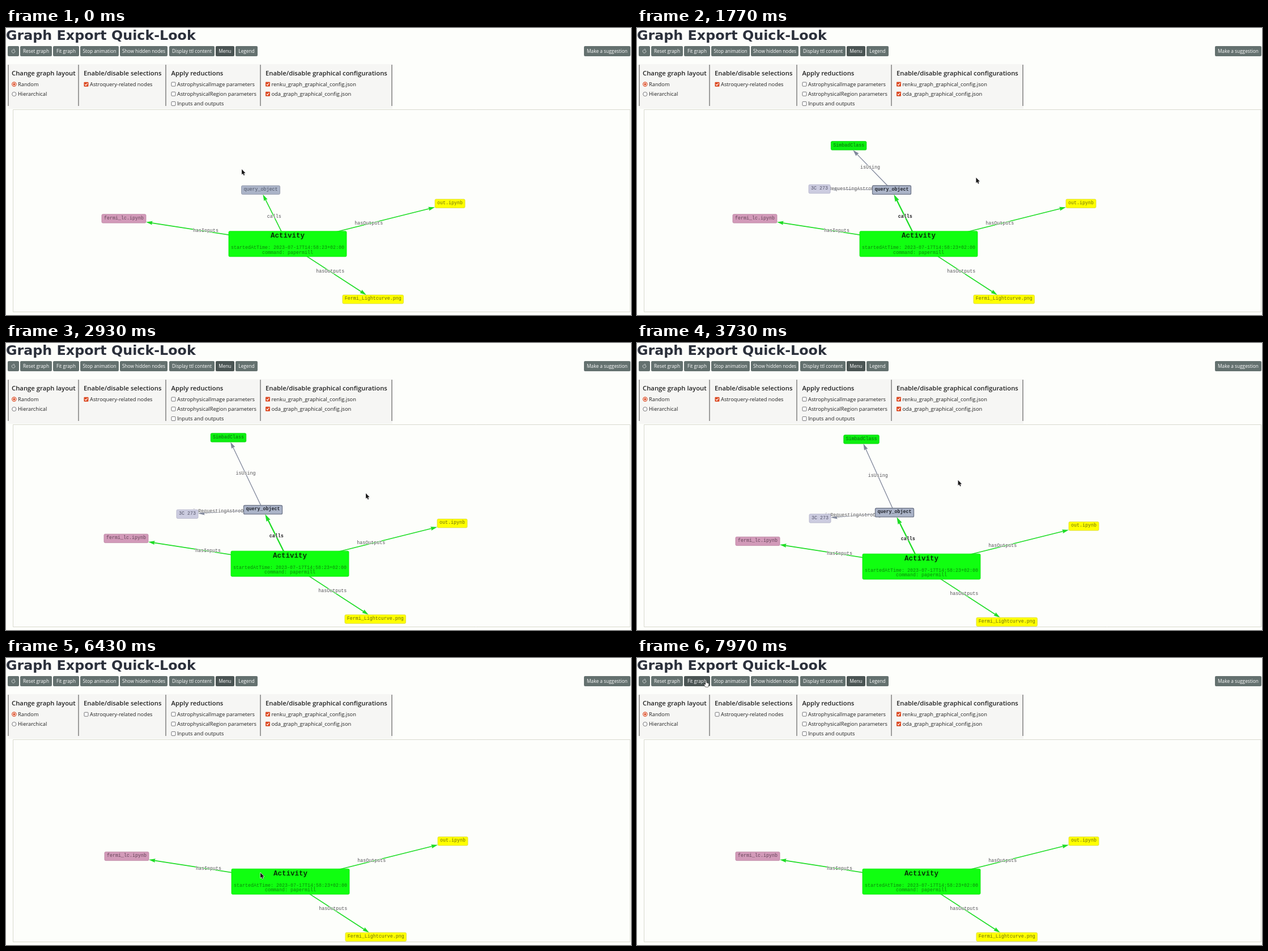
An HTML page with a canvas that plays this animation: 1103 by 508 pixels, repeating every 8000 ms.

```html
<!DOCTYPE html>
<html lang="en">
<head>
<meta charset="utf-8">
<title>Graph Export Quick-Look</title>
<style>
  html, body { margin: 0; width: 100%; height: 100%; overflow: hidden; background: #fdfefb; }
  canvas { display: block; }
</style>
</head>
<body>
<canvas id="stage" width="1103" height="508"></canvas>
<script>
const ctx = document.getElementById('stage').getContext('2d');
const LOOP = 8000, EXPAND = 800, UNCHECK = 4600;
const UI = '"Open Sans", "Noto Sans", sans-serif';
const MONO = '"Liberation Mono", "Courier New", monospace';
const ORANGE = '#dc4a23', GREEN = '#1fdd26', GREY = '#7f869a';

// Key poses: [time, x, y]
const cursorPath = [
  [30, 416, 250], [430, 449, 284], [1000, 450, 284], [1130, 562, 283], [2330, 628, 250],
  [2670, 631, 257.5], [2930, 635, 266], [3100, 636, 271], [3500, 636, 271], [4400, 212, 98],
  [5730, 212, 98], [6400, 449, 380], [6440, 449, 380], [6560, 385, 205], [7380, 200, 110], [7900, 121, 40]
];
const simbadPath = [
  [1130, 398, 284.5], [1450, 381, 245], [1800, 373, 205], [2330, 376, 174.3], [2930, 388.5, 159], [3500, 391, 157]
];
const objectPath = [
  [1130, 395, 287], [1450, 345, 285], [1800, 320, 285], [2330, 314, 288.7], [2930, 316, 294.3], [3500, 318, 297]
];

const linear = k => k;
const smooth = k => k * k * (3 - 2 * k);

function along(path, t, ease) {
  if (t <= path[0][0]) return { x: path[0][1], y: path[0][2] };
  for (let i = 1; i < path.length; i++) {
    const [t0, x0, y0] = path[i - 1], [t1, x1, y1] = path[i];
    if (t < t1) {
      const k = ease((t - t0) / (t1 - t0));
      return { x: x0 + (x1 - x0) * k, y: y0 + (y1 - y0) * k };
    }
  }
  const last = path[path.length - 1];
  return { x: last[1], y: last[2] };
}

function text(str, x, y, font, color, align = 'left', baseline = 'alphabetic') {
  ctx.font = font;
  ctx.fillStyle = color;
  ctx.textAlign = align;
  ctx.textBaseline = baseline;
  ctx.fillText(str, x, y);
}

function roundBox(x, y, w, h, r, fill, stroke, width = 1) {
  ctx.beginPath();
  ctx.roundRect(x, y, w, h, r);
  if (fill) { ctx.fillStyle = fill; ctx.fill(); }
  if (stroke) { ctx.strokeStyle = stroke; ctx.lineWidth = width; ctx.stroke(); }
}

function polyline(points, color, width) {
  ctx.beginPath();
  points.forEach(([x, y]) => ctx.lineTo(x, y));
  ctx.strokeStyle = color;
  ctx.lineWidth = width;
  ctx.stroke();
}

// Toolbar and menu

const buttons = [
  [3, 23, ''], [25, 81, 'Reset graph'], [83, 129, 'Fit graph'], [131, 199, 'Stop animation'],
  [201, 285, 'Show hidden nodes'], [288, 368, 'Display ttl content'], [370, 403, 'Menu'],
  [405, 444, 'Legend'], [1020, 1102, 'Make a suggestion']
];

function overButton(p) {
  return p.y >= 32 && p.y <= 50 && buttons.find(([l, r]) => p.x >= l && p.x <= r);
}

function drawToolbar(hovered) {
  text('Graph Export Quick-Look', 0, 20.7, 'bold 23.8px "DejaVu Sans", sans-serif', '#2b303b');
  for (const button of buttons) {
    const [left, right, label] = button;
    const dark = label === 'Menu' || button === hovered;
    roundBox(left, 32, right - left, 18, 2, dark ? '#4b5554' : '#64716f');
    text(label, (left + right) / 2, 44, '8.3px ' + UI, '#fff', 'center');
  }
  ctx.beginPath();
  ctx.arc(13, 41.3, 2.9, -0.5, 4.6);
  ctx.strokeStyle = '#e4e8e7';
  ctx.lineWidth = 0.8;
  ctx.stroke();
  polyline([[13, 37], [15.2, 38.5], [13.2, 40]], '#e4e8e7', 0.8);
}

function checkbox(x, y, checked, hover) {
  if (!checked) return roundBox(x - 3.5, y - 3.5, 7, 7, 1, '#fff', hover ? '#333' : '#77777a');
  roundBox(x - 4, y - 4, 8, 8, 1, ORANGE);
  polyline([[x - 2.2, y], [x - 0.6, y + 1.8], [x + 2.3, y - 1.9]], '#fff', 1.2);
}

function radio(x, y, checked) {
  ctx.beginPath();
  ctx.arc(x, y, 3.6, 0, 7);
  ctx.fillStyle = '#fff';
  ctx.fill();
  ctx.strokeStyle = checked ? ORANGE : '#77777a';
  ctx.lineWidth = checked ? 1.2 : 1;
  ctx.stroke();
  if (!checked) return;
  ctx.beginPath();
  ctx.arc(x, y, 1.9, 0, 7);
  ctx.fillStyle = ORANGE;
  ctx.fill();
}

function drawMenu(t, cursor) {
  ctx.fillStyle = '#f6f6f4';
  ctx.fillRect(4, 64, 678, 79);
  for (const x of [4, 128, 282, 449, 681]) polyline([[x, 65], [x, 138]], '#444', 1);

  const heading = (str, x) => text(str, x, 84.3, '600 11.3px ' + UI, '#222');
  const option = (str, x, y) => text(str, x, y + 3.3, '9.3px ' + UI, '#222');

  heading('Change graph layout', 10);
  radio(14.3, 99.5, true);
  option('Random', 21, 99.5);
  radio(14.3, 117, false);
  option('Hierarchical', 21, 117);

  heading('Enable/disable selections', 137);
  const hover = cursor.y > 94 && cursor.y < 106 && cursor.x > 137 && cursor.x < 260;
  checkbox(141.5, 99.7, t < UNCHECK, hover);
  option('Astroquery-related nodes', 148, 99.5);

  heading('Apply reductions', 291.5);
  ['AstrophysicalImage parameters', 'AstrophysicalRegion parameters', 'Inputs and outputs'].forEach((str, i) => {
    const y = 99.5 + i * 17.2;
    checkbox(295.5, y, false);
    option(str, 302, y);
  });

  heading('Enable/disable graphical configurations', 458);
  ['renku_graph_graphical_config.json', 'oda_graph_graphical_config.json'].forEach((str, i) => {
    const y = 99.5 + i * 17.2;
    checkbox(462, y, true);
    option(str, 468.5, y);
  });
}

// Graph

const node = (label, x, y, w, h, fill, border, ink) => ({ label, x, y, w, h, fill, border, ink });
const activity = node('', 497, 382.2, 208, 45, '#10ff10', '#0ce40c');
const notebook = node('fermi_lc.ipynb', 208, 337.4, 78, 15.4, '#d29ab9', '#b982a0', '#66465a');
const output = node('out.ipynb', 783.5, 310.7, 53, 15.4, '#ffff00', '#d8d83a', '#6c6c10');
const picture = node('Fermi_Lightcurve.png', 647.7, 480.2, 107.5, 15.4, '#ffff00', '#d8d83a', '#6c6c10');
const query = node('query_object', 449.5, 286.7, 68, 15.4, '#abb4c8', '#8b92a2', '#4c5364');
const simbad = node('SimbadClass', 0, 0, 62.5, 15.4, '#0cf010', '#0ad60c', '#0b6a0e');
const object3c = node('3C 273', 0, 0, 38, 15.4, '#cccce0', '#b2b2c8', '#55556a');

function drawNode(n, bold) {
  roundBox(n.x - n.w / 2, n.y - n.h / 2, n.w, n.h, 2, n.fill, bold ? '#70788a' : n.border, bold ? 1.3 : 0.8);
  text(n.label, n.x, n.y - 1, (bold ? 'bold ' : '') + '8.33px ' + MONO, bold ? '#22262e' : n.ink, 'center', 'middle');
}

function drawActivity() {
  drawNode(activity);
  const { x, y } = activity;
  text('Activity', x, y - 14, 'bold 12.5px ' + MONO, '#072f07', 'center', 'middle');
  text('startedAtTime: 2023-07-17T14:58:23+02:00', x, y + 7, '8.33px ' + MONO, '#0b870b', 'center', 'middle');
  text('command: papermill', x, y + 15.5, '8.33px ' + MONO, '#0b870b', 'center', 'middle');
}

function drawEdge(from, to, label, color, bold) {
  const dx = to.x - from.x, dy = to.y - from.y;
  const reach = Math.min(to.w / 2 / Math.abs(dx || 1e-6), to.h / 2 / Math.abs(dy || 1e-6));
  const tipX = to.x - dx * reach, tipY = to.y - dy * reach;
  const width = bold ? 2.3 : color === GREY ? 1.3 : 1.6, size = bold ? 13 : 11.5;
  const ux = dx / Math.hypot(dx, dy), uy = dy / Math.hypot(dx, dy);
  polyline([[from.x, from.y], [tipX - ux * size * 0.8, tipY - uy * size * 0.8]], color, width);
  ctx.beginPath();
  for (const [back, side] of [[0, 0], [1, 0.3], [0.9, 0], [1, -0.3]])
    ctx.lineTo(tipX - (ux * back + uy * side) * size, tipY - (uy * back - ux * side) * size);
  ctx.fillStyle = color;
  ctx.fill();

  const midX = (from.x + to.x) / 2, midY = (from.y + to.y) / 2 - 0.8;
  ctx.font = (bold ? 'bold ' : '') + '8.33px ' + MONO;
  ctx.textAlign = 'center';
  ctx.textBaseline = 'middle';
  ctx.lineJoin = 'round';
  ctx.lineWidth = 1.2;
  ctx.strokeStyle = '#fff';
  ctx.strokeText(label, midX, midY);
  text(label, midX, midY, ctx.font, bold ? '#222' : '#555', 'center', 'middle');
}

function drawGraph(t) {
  const expanded = t >= EXPAND, visible = t < UNCHECK;
  Object.assign(simbad, along(simbadPath, t, linear));
  Object.assign(object3c, along(objectPath, t, linear));

  // The view is dragged along with the cursor.
  const grip = along(cursorPath, Math.min(Math.max(t, 2670), 3300), smooth);
  ctx.save();
  ctx.beginPath();
  ctx.rect(13, 145, 1088, 357);
  ctx.clip();
  ctx.translate(grip.x - 631, grip.y - 257.5);
  drawEdge(activity, notebook, 'hasInputs', GREEN);
  drawEdge(activity, output, 'hasOutputs', GREEN);
  drawEdge(activity, picture, 'hasOutputs', GREEN);
  if (visible) {
    drawEdge(activity, query, 'calls', GREEN, expanded);
    if (expanded) {
      drawEdge(query, object3c, 'isRequestingAstroObject', GREY);
      drawEdge(query, simbad, 'isUsing', GREY);
      drawNode(object3c);
      drawNode(simbad);
    }
    drawNode(query, expanded);
  }
  [notebook, output, picture].forEach(n => drawNode(n));
  drawActivity();
  ctx.restore();
}

function drawCursor({ x, y }, hand) {
  const arrow = [[0, 0], [0, 9.5], [2.1, 7.6], [3.6, 11], [5.2, 10.3], [3.8, 7], [6.6, 6.8]];
  const pointer = [[0, 0.5], [1.4, 0.5], [1.6, 4], [5.5, 5], [5.5, 8], [4.5, 11], [0, 11], [-2.6, 7.2], [-1.8, 6.3], [0, 7.4]];
  ctx.beginPath();
  for (const [px, py] of hand ? pointer : arrow) ctx.lineTo(x + px, y + py);
  ctx.closePath();
  ctx.lineJoin = 'round';
  ctx.strokeStyle = hand ? '#111' : '#fff';
  ctx.lineWidth = 1.1;
  ctx.stroke();
  ctx.fillStyle = hand ? '#fff' : '#1c1c1c';
  ctx.fill();
}

function frame(now) {
  const t = now % LOOP;
  const cursor = along(cursorPath, t, smooth);
  const hovered = overButton(cursor);
  ctx.fillStyle = '#fdfefb';
  ctx.fillRect(0, 0, 1103, 508);
  drawToolbar(hovered);
  drawMenu(t, cursor);
  roundBox(12.5, 144.5, 1089, 358, 0, null, '#d9dacf');
  drawGraph(t);
  drawCursor(cursor, hovered);
  requestAnimationFrame(frame);
}
requestAnimationFrame(frame);
</script>
</body>
</html>
```
